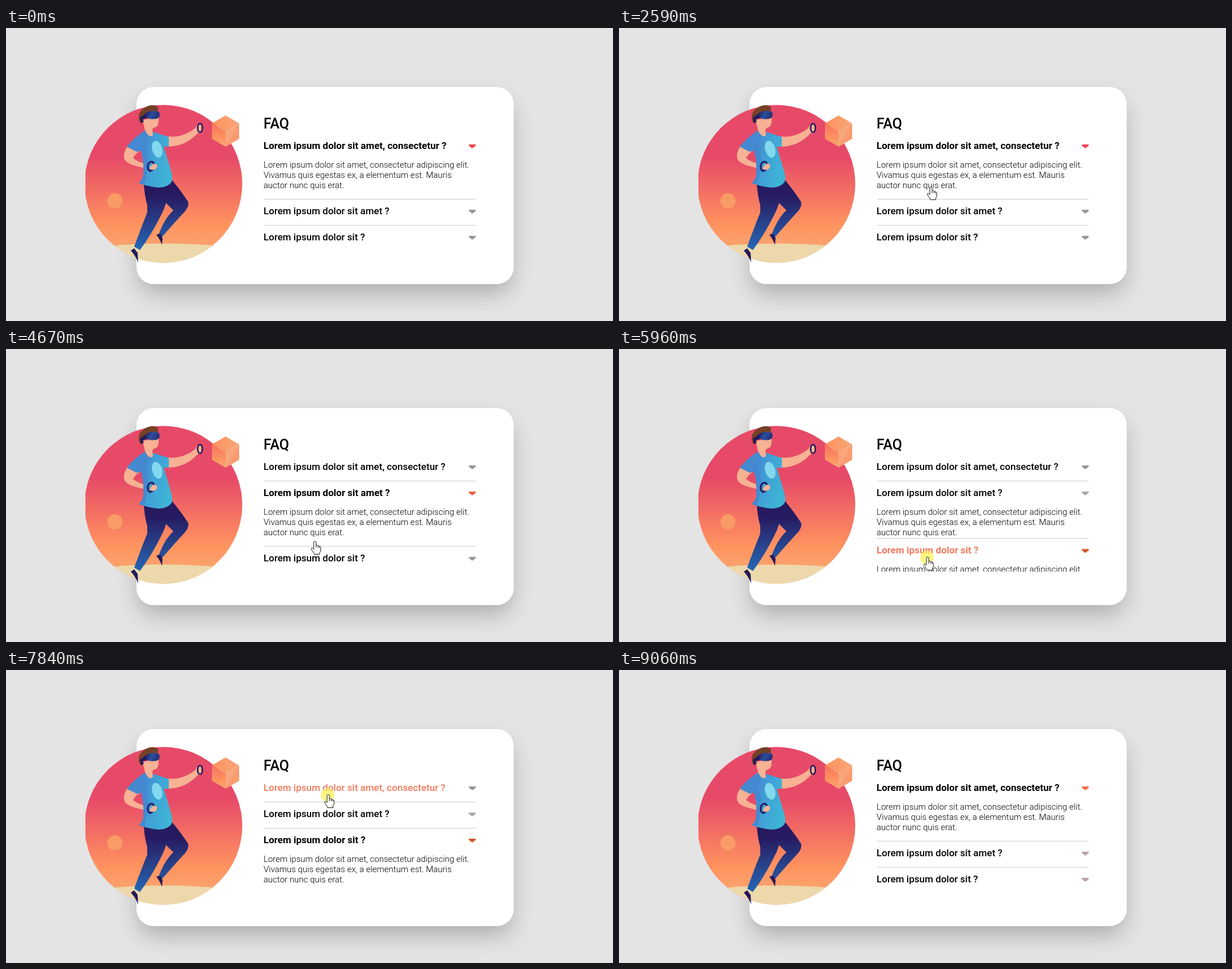
An HTML page for the animation above (9490 ms loop, 1070 by 516 pixels).

```html
<!DOCTYPE html>
<html lang="en">
<head>
<meta charset="utf-8">
<title>FAQ accordion</title>
<style>
  html, body { margin: 0; width: 100%; height: 100%; overflow: hidden; background: #e4e4e4; }
  .card { position: absolute; left: 230px; top: 104px; width: 665px; height: 347px; border-radius: 30px;
    background: #fff; box-shadow: 0 20px 40px -5px rgba(0, 0, 0, .25); }
  #stage { position: absolute; left: 0; top: 0; font-family: Roboto, sans-serif; }
  .question { font-size: 17px; font-weight: 500; }
  .answer { font-size: 15px; font-weight: 300; }
</style>
</head>
<body>
<div class="card"></div>
<svg id="stage" width="1070" height="516">
  <defs>
    <linearGradient id="sky" x1="0" y1="136" x2="0" y2="413" gradientUnits="userSpaceOnUse">
      <stop offset=".33" stop-color="#e74a68"/><stop offset=".76" stop-color="#ff935f"/><stop offset="1" stop-color="#f8ae78"/>
    </linearGradient>
    <linearGradient id="denim" x1="0" y1="295" x2="0" y2="392" gradientUnits="userSpaceOnUse">
      <stop stop-color="#271a60"/><stop offset=".55" stop-color="#28468f"/><stop offset="1" stop-color="#2567b8"/>
    </linearGradient>
    <linearGradient id="visor" x1="0" x2="1" y2=".3">
      <stop stop-color="#241b60"/><stop offset=".5" stop-color="#2a4f9d"/><stop offset="1" stop-color="#27317b"/>
    </linearGradient>
    <linearGradient id="shirt" x1="236" y1="226" x2="290" y2="238" gradientUnits="userSpaceOnUse">
      <stop stop-color="#4486d0"/><stop offset=".4" stop-color="#41a0d6"/><stop offset="1" stop-color="#3eb4d6"/>
    </linearGradient>
    <linearGradient id="side" x2="0" y2="1"><stop stop-color="#f4705f"/><stop offset=".6" stop-color="#fd935f"/><stop offset="1" stop-color="#f9a672"/></linearGradient>
    <linearGradient id="lid" x2="1"><stop stop-color="#ff925c"/><stop offset="1" stop-color="#f7a67a"/></linearGradient>
    <clipPath id="disc"><circle cx="277.5" cy="274.5" r="139"/></clipPath>
    <clipPath id="edge"><rect x="140" y="130" width="290" height="290"/></clipPath>
  </defs>

  <g clip-path="url(#edge)">
    <g clip-path="url(#disc)">
      <rect x="138" y="135" width="280" height="280" fill="url(#sky)"/>
      <path d="M180 384Q278 375 376 384V415H180Z" fill="#edd8ab"/>
    </g>
    <circle cx="192" cy="304.5" r="13.5" fill="#f99b66"/>
  </g>

  <path d="M387 154L411 168 387 182 363 168Z" fill="url(#lid)"/>
  <path d="M363 168L387 182V209L363 195Z" fill="url(#side)"/>
  <path d="M411 168L387 182V209L411 195Z" fill="#f8a67c"/>
  <path d="M411 168L387 209 411 195Z" fill="#fb9c70"/>

  <g id="player">
    <path d="M281 270L293 268Q310 289 321 306Q323 312 317 321Q295 345 275 368L269 364Q279 336 295 321L280 306Z" fill="url(#denim)"/>
    <path d="M243 275H288Q285 303 278 320Q258 362 236 391L226 385Q240 347 249 325V312Q244 294 243 275Z" fill="url(#denim)"/>
    <path d="M265 364L272 362 276 370 275 382Q272 373 265 364ZM220 392L226 388 232 396 233 413Q229 402 220 392Z" fill="#241a5c"/>
    <path d="M285 191Q311 194 334 176L339 184Q317 209 284 209ZM214 208Q204 224 210 233Q216 242 252 248L253 241Q233 237 224 229Q228 221 237 216Z" fill="#f7b193"/>
    <path d="M334 176Q337 168 344 168Q347 172 345 181Q341 187 335 184ZM251 242Q257 236 266 240Q269 245 262 250Q255 252 251 247Z" fill="#f7b193"/>
    <ellipse cx="342" cy="176" rx="4.2" ry="7.8" fill="none" stroke="#231a5e" stroke-width="2.6"/>
    <path d="M246 180Q253 192 260 183L287 192 287 209 278 209Q285 232 290 249Q295 264 292 271Q283 284 260 280Q246 278 234 273Q243 266 242 254Q243 231 238 216L231 218 213 209Q226 192 246 180Z" fill="url(#shirt)"/>
    <path d="M246 180L213 209 231 218 239 211Z" fill="#4589d1"/>
    <path d="M244 209Q257 231 243 276L234 273Q243 266 242 254Q243 231 238 216Z" fill="#4489d1"/>
    <ellipse cx="266.5" cy="213.5" rx="8.8" ry="15" transform="rotate(-16 266.5 213.5)" fill="#82d8ec"/>
    <path d="M264 244L259 236Q252 234 250 242Q249 250 254 252L260 249" fill="none" stroke="#231a5e" stroke-width="3"/>
    <path d="M254 246Q257 238 264 239Q269 243 264 248Q259 252 254 248Z" fill="#f7b193"/>
    <path d="M241 162L269 157Q270 171 265 174Q261 175 258 178L259 189Q252 195 245 180Z" fill="#f7b193"/>
    <path d="M234 160Q233 148 242 142Q250 135 262 136L268 139V146L250 149 243 158 239 169Q235 166 234 160Z" fill="#744127"/>
    <path d="M236 158L248 149 250 158 241 161 243 165 238 167Z" fill="#251a5c"/>
    <path d="M247 151Q249 146 259 146L269 147Q272 150 270 157Q265 162 253 160Q246 158 247 151Z" fill="url(#visor)"/>
  </g>

  <text x="454" y="177" font-size="25" font-weight="500">FAQ</text>
  <g id="list"></g>
  <circle id="click" r="12" fill="#fff04d" opacity=".7"/>
  <g id="hand" stroke="#111" stroke-linejoin="round">
    <path fill="#fff" d="M-2 14.5V2.5Q-2 .5 0 .5T2 2.5V7.5Q5 6.5 5.3 8.5Q8 8 8 9.8Q10.3 9.8 10.3 12V16Q10 18.5 8.3 21V23.5H-1Q-2 20.5-4 18Q-7 14.5-6.6 13.3Q-5.5 11.3-2 14.5Z"/>
    <path fill="none" d="M2 8v4M5.3 9v3M8 10v2.5"/>
  </g>
</svg>
<script>
const LOOP = 9490, ROW = 46, ANSWER = 69;
const questions = ['Lorem ipsum dolor sit amet, consectetur ?', 'Lorem ipsum dolor sit amet ?', 'Lorem ipsum dolor sit ?'];
const answer = ['Lorem ipsum dolor sit amet, consectetur adipiscing elit.',
  'Vivamus quis egestas ex, a elementum est. Mauris', 'auctor nunc quis erat.'];

// Pointer strokes: start, end, steps, from, bend, to, ease-out power
const moves = [
  [430, 1360, 14, [580, 522], [565, 360], [556, 213], 2.4],
  [2440, 3090, 10, [556, 213], [551, 270], [545, 328], 2.4],
  [4670, 5100, 7, [545, 328], [544, 347], [544, 366], 2],
  [7040, 7630, 9, [544, 366], [556, 292], [568, 219], 3.4],
  [8540, 9060, 8, [568, 219], [766, 484], [1000, 525], 1.4]
];
const clicks = [[3670, 3740], [5900, 5970], [7840, 7990]];
const $ = id => document.getElementById(id);
const set = (el, attrs) => { for (const k in attrs) el.setAttribute(k, attrs[k]); };

function add(parent, tag, attrs, text = '') {
  const el = document.createElementNS('http://www.w3.org/2000/svg', tag);
  set(el, attrs);
  el.textContent = text;
  return parent.appendChild(el);
}

const items = questions.map((text, i) => {
  const g = add($('list'), 'g', {});
  const title = add(g, 'text', { x: 454, y: 6, class: 'question' }, text);
  const body = add(g, 'svg', { x: 450, y: 24, width: 385 });
  answer.forEach((line, n) => add(body, 'text', { x: 4, y: 15 + 18 * n, class: 'answer' }, line));
  const rule = i < 2 && add(g, 'rect', { x: 455, width: 373, height: 1, fill: '#ccc' });
  const arrow = add(g, 'path', { d: 'M817-2H827Q829-1.5 828 .3L823.5 4Q822 5.2 820.5 4L816 .3Q815-1.5 817-2Z' });
  return { g, title, body, rule, arrow };
});

// Share of a stepped change done at time t; the first step shows at the start
function stepped(t, start, end, steps) {
  if (t < start) return 0;
  const k = Math.floor((t - start) / (end - start) * (steps - 1) + 1e-6);
  return Math.min(1, (k + 1) / steps);
}

function pointer(t) {
  const [start, end, steps, a, b, c, power] = moves.filter(m => t >= m[0]).pop() || moves[0];
  const p = 1 - (1 - stepped(t, start, end, steps)) ** power;
  return a.map((v, i) => v * (1 - p) ** 2 + 2 * b[i] * p * (1 - p) + c[i] * p * p);
}

function draw(t) {
  const second = stepped(t, 3670, 3960, 5), third = stepped(t, 5900, 6180, 5), reset = t >= 7990;
  const open = reset ? [1, 0, 0] : [1 - second, second - third, third];
  const active = reset || t < 3670 ? 0 : t < 5900 ? 1 : 2;
  const accent = reset ? '#f27048' : ['#ef4854', '#e8633f', '#d05a2c'][active];
  const [px, py] = pointer(t);
  let y = 207;

  items.forEach(({ g, title, body, rule, arrow }, i) => {
    const grow = ANSWER * open[i];
    const hover = px > 455 && px < 828 && Math.abs(py - y) < 16;
    const bold = i === active || (i === 2 && reset && t < 8180);
    const idle = reset ? '#bca4a9' : active === 2 && i === 1 ? '#aaa' : '#999';
    set(g, { transform: `translate(0 ${y})` });
    set(title, { fill: hover ? '#f27a5e' : '#000', style: `font-weight:${bold ? 700 : 500}` });
    set(body, { height: grow });
    if (rule) set(rule, { y: 25 + grow });
    set(arrow, { fill: i === active ? accent : idle });
    y += ROW + grow;
  });

  set($('hand'), { transform: `translate(${px} ${py})` });
  const pressed = clicks.some(([from, to]) => t >= from && t < to);
  set($('click'), { cx: px - 1, cy: py + 1, visibility: pressed ? 'visible' : 'hidden' });
}

function frame() {
  draw(performance.now() % LOOP);
  requestAnimationFrame(frame);
}
frame();
</script>
</body>
</html>
```
